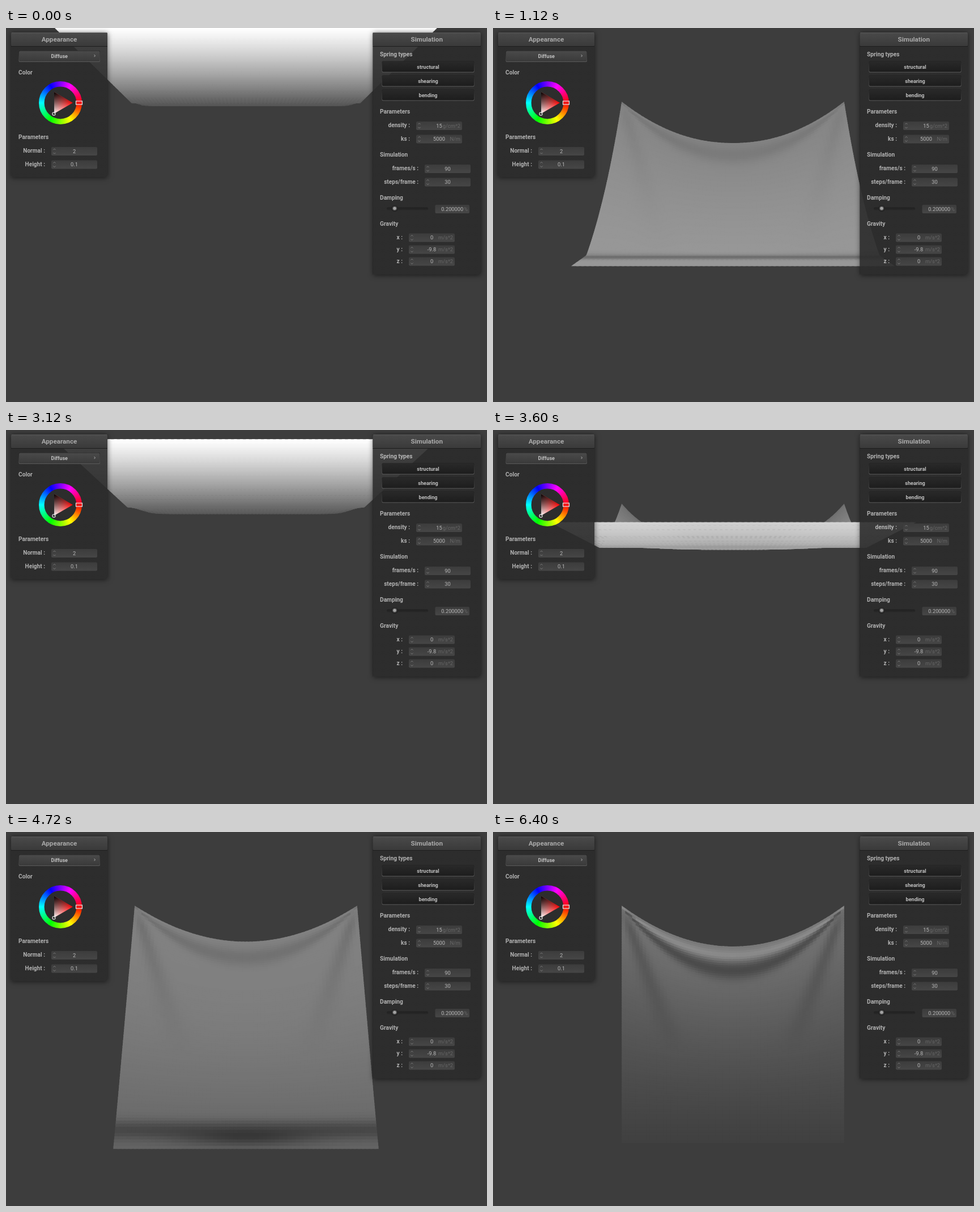
An HTML page with a canvas that plays this animation: 849 by 660 pixels, repeating every 6480 ms.

```html
<!DOCTYPE html>
<html lang="en">
<head>
<meta charset="utf-8">
<title>Cloth simulation</title>
<style>
  html, body { margin: 0; width: 100%; height: 100%; overflow: hidden; background: #3d3d3d; }
  canvas { display: block; }
</style>
</head>
<body>
<canvas id="stage" width="849" height="660"></canvas>
<script>
const W = 849, H = 660, LOOP = 6480, STEP = 80;
const CX = 423.5, HORIZON = 330, PIN_Y = 130, HALF = 196.3, DEPTH = 928;
const COLS = 64, ROWS = 90;

// Side profile of the cloth: pin -> kink -> free end, as forward distance and drop.
// time, kinkZ, kinkDrop, endZ, endDrop, sag, sagPower, bulge
const POSE = [
  [0, 0, 0, 393, 0, 0, 30, 0],
  [238, 25, 8, 393, 8, 8, 25, 0],
  [350, 56, 18.5, 391, 18.5, 18.5, 14, 1],
  [800, 150, 91, 368, 91, 62, 4, 8],
  [1358, 224, 254, 290, 262, 73, 2.1, 24],
  [1678, 190, 335, 212, 352, 70, 2, 12],
  [2078, 112, 358, 127, 403, 62, 2, 0],
  [2670, 51, 368, 58, 418, 69, 2, 0],
  [3630, 0, 369, 0, 419, 72, 2, 0]
];
// time, light at top, middle and end, kink band, bottom pool, ridge, arc fold, arc radius, diagonal fold
const LIGHT = [
  [0, 80, 165, 258, 0, 0, 0, 0, 95, 0],
  [350, 88, 158, 256, 0, 0, 0, 0, 95, 0],
  [800, 112, 172, 215, 10, 0, 0, 4, 95, 0],
  [1358, 132, 147, 152, 42, 0, 0, 12, 95, 8],
  [1678, 130, 138, 130, 36, 8, 0, 14, 92, 14],
  [2078, 128, 116, 90, 30, 34, 2, 16, 92, 20],
  [2670, 122, 94, 74, 0, 0, 8, 18, 105, 27],
  [3630, 118, 88, 64, 0, 0, 26, 36, 112, 28]
];

const ctx = document.getElementById('stage').getContext('2d');
const bell = x => Math.exp(-x * x);

// Smooth interpolation of every column through the keys.
function sample(keys, time) {
  const last = keys.length - 1;
  const t = Math.min(time, keys[last][0]);
  let i = 0;
  while (i < last - 1 && t > keys[i + 1][0]) i++;
  const a = keys[Math.max(i - 1, 0)], b = keys[i], c = keys[i + 1], d = keys[Math.min(i + 2, last)];
  const span = c[0] - b[0], s = (t - b[0]) / span;
  return b.slice(1).map((p, k) => {
    const q = c[k + 1];
    const m0 = (q - a[k + 1]) / (c[0] - a[0]) * span;
    const m1 = (d[k + 1] - p) / (d[0] - b[0]) * span;
    const e = s * s * (3 - 2 * s);
    return p + (q - p) * e + m0 * s * (1 - s) ** 2 - m1 * s * s * (1 - s);
  });
}

function drawCloth(time) {
  const [kz, kd, ez, ed, sag, power, bulge] = sample(POSE, time);
  const [top, mid, end, band, pool, ridge, fold, radius, diagonal] = sample(LIGHT, time);
  const upper = Math.hypot(kz, kd);
  const kink = Math.max(upper / (upper + Math.hypot(ez - kz, ed - kd)), 0.001);

  function point(u, v) {
    let z, drop;
    if (v < kink) {
      const a = v / kink;
      z = kz * a;
      drop = kd * a + 4 * bulge * a * (1 - a) + sag * (1 - Math.abs(u) ** power) * (1 - a);
    } else {
      const a = (v - kink) / (1 - kink);
      z = kz + (ez - kz) * a;
      drop = kd + (ed - kd) * a;
    }
    const scale = DEPTH / (DEPTH - z);
    return { x: CX + u * HALF * scale, y: HORIZON + (PIN_Y - HORIZON + drop) * scale, drop };
  }

  function shade(u, v, drop) {
    const base = top * (1 - v) * (1 - 2 * v) + mid * 4 * v * (1 - v) + end * v * (2 * v - 1);
    const r = drop / (1.02 - u * u);
    const inset = HALF * (1 - Math.abs(u));
    const fade = Math.min(1, drop / 40) * Math.max(0, 1 - drop / 260);
    return base
      - band * bell((v - kink - 0.03) / 0.035)
      - pool * bell(u / 0.5) * bell((v - 0.965) / 0.03)
      + ridge * bell((r - radius + 25) / 10)
      - fold * bell((r - radius) / 16)
      - diagonal * fade * bell((inset - 0.37 * drop) / (7 + 0.06 * drop));
  }

  // Cells reach under their later neighbours so that no seams show.
  for (let j = 0; j < ROWS; j++) {
    const v0 = j / ROWS, v1 = Math.min((j + 1.5) / ROWS, 1);
    for (let i = 0; i < COLS; i++) {
      const u0 = i / COLS * 2 - 1, u1 = Math.min((i + 1.5) / COLS, 1) * 2 - 1;
      const um = (i + 0.5) / COLS * 2 - 1, vm = (j + 0.5) / ROWS;
      const l = Math.round(shade(um, vm, point(um, vm).drop));
      ctx.fillStyle = `rgb(${l},${l},${l})`;
      ctx.beginPath();
      for (const [u, v] of [[u0, v0], [u1, v0], [u1, v1], [u0, v1]]) {
        const p = point(u, v);
        ctx.lineTo(p.x, p.y);
      }
      ctx.fill();
    }
  }
}

// Panels are painted once on their own layer.
const layer = document.createElement('canvas');
layer.width = W;
layer.height = H;
const ui = layer.getContext('2d');
const INK = 'rgba(255,255,255,.63)', DIM = '#666';

function text(str, x, y, size, { bold = true, align = 'left', color = INK } = {}) {
  ui.font = `${bold ? 'bold ' : ''}${size}px Roboto, sans-serif`;
  ui.textAlign = align;
  ui.textBaseline = 'middle';
  ui.fillStyle = color;
  ui.fillText(str, x, y + 0.5);
}

function box(x, y, w, h, from, to, r = 2) {
  const g = ui.createLinearGradient(0, y, 0, y + h);
  g.addColorStop(0, from);
  g.addColorStop(1, to);
  ui.fillStyle = g;
  ui.beginPath();
  ui.roundRect(x, y, w, h, r);
  ui.fill();
}

function line(color, width, ...pts) {
  ui.strokeStyle = color;
  ui.lineWidth = width;
  ui.beginPath();
  pts.forEach(p => ui.lineTo(...p));
  ui.stroke();
}

function panel(title, x, y, w, h) {
  ui.save();
  ui.beginPath();
  ui.rect(0, 0, W, H);
  ui.rect(x, y, w, h);
  ui.clip('evenodd');
  ui.shadowColor = 'rgba(0,0,0,.6)';
  ui.shadowBlur = 9;
  ui.shadowOffsetY = 1;
  ui.fillStyle = '#000';
  ui.fillRect(x, y, w, h);
  ui.restore();
  box(x, y, w, h, 'rgba(43,43,43,.9)', 'rgba(43,43,43,.9)');
  box(x, y, w, 24, '#4a4a4a', '#3a3a3a');
  line('#5a5a5a', 1, [x + 1, y + 0.5], [x + w - 1, y + 0.5]);
  line('#1d1d1d', 1, [x, y + 24.5], [x + w, y + 24.5]);
  text(title, x + w / 2, 20, 11.7, { align: 'center', color: '#a9a9a9' });
}

function button(label, x, y, w, from, to) {
  box(x - 0.5, y - 0.5, w + 1, 20, '#1d1d1d', '#5c5c5c');
  box(x, y, w, 18.5, from, to);
  text(label, x + w / 2, y + 9.5, 9.1, { align: 'center', color: '#c0c0c0' });
}

function field(label, value, x, y, unit = '', w = 81, spin = true) {
  if (label) text(label + ' :', x - 11, y + 7, 10.1, { align: 'right' });
  box(x, y, w, 15, '#3c3c3c', '#464646');
  text(value, x + w / 2, y + 7.5, 9.3, { bold: false, align: 'center' });
  text(unit, x + w - 3, y + 7.5, 9.3, { bold: false, align: 'right', color: DIM });
  if (spin) for (const s of [-1, 1])
    line('#7c7c7c', 1, [x + 3.5, y + 7.5 + 2.5 * s], [x + 5.5, y + 7.5 + 4.5 * s], [x + 7.5, y + 7.5 + 2.5 * s]);
}

function colorWheel(x, y) {
  const hue = ui.createConicGradient(0, x, y);
  for (let i = 0; i <= 6; i++) hue.addColorStop(i / 6, `hsl(${i * 60},100%,50%)`);
  ui.strokeStyle = hue;
  ui.lineWidth = 9.5;
  ui.beginPath();
  ui.arc(x, y, 33.2, 0, 7);
  ui.stroke();

  const tip = [x + 22, y], black = [x - 11, y - 19], white = [x - 11, y + 19];
  const tint = ui.createLinearGradient(...tip, ...white);
  tint.addColorStop(0, '#f00');
  tint.addColorStop(1, '#fff');
  const dark = ui.createLinearGradient(x + 5.5, y + 9.5, ...black);
  dark.addColorStop(0, 'rgba(0,0,0,0)');
  dark.addColorStop(1, '#000');
  ui.beginPath();
  [tip, black, white].forEach(p => ui.lineTo(...p));
  ui.closePath();
  for (const g of [tint, dark]) {
    ui.fillStyle = g;
    ui.fill();
  }
  ui.strokeStyle = '#ddd';
  ui.lineWidth = 1.2;
  ui.beginPath();
  ui.arc(white[0] - 0.5, white[1] + 0.5, 2.6, 0, 7);
  ui.stroke();
  ui.fillStyle = '#f01818';
  ui.fillRect(x + 27.5, y - 3, 11, 6);
  ui.strokeStyle = '#e8e8e8';
  ui.strokeRect(x + 27.5, y - 3, 11, 6);
}

function drawPanels() {
  const heading = (str, x, y) => text(str, x, y, 10.2);

  panel('Appearance', 9, 8, 170, 255);
  button('Diffuse', 23, 40.5, 142.5, '#4a4a4a', '#3a3a3a');
  line('#b0b0b0', 1, [155.5, 47], [157.5, 49], [155.5, 51]);
  heading('Color', 22, 78);
  colorWheel(96, 132);
  heading('Parameters', 22, 192);
  field('Normal', '2', 80, 210);
  field('Height', '0.1', 80, 233.5);

  panel('Simulation', 647.5, 8, 190.5, 427);
  heading('Spring types', 660, 46.5);
  ['structural', 'shearing', 'bending'].forEach((s, i) => button(s, 664, 59 + 25 * i, 162, '#292929', '#1d1d1d'));
  heading('Parameters', 660, 147);
  field('density', '15', 724, 165, 'g/cm^2');
  field('ks', '5000', 724, 188.5, 'N/m');
  heading('Simulation', 660, 223);
  field('frames/s', '90', 739, 241);
  field('steps/frame', '30', 739, 264.5);
  heading('Damping', 660, 299);
  box(672, 316.5, 73, 5, '#202020', '#282828');
  ui.fillStyle = '#1c1c1c';
  ui.beginPath();
  ui.arc(686, 318.5, 5.5, 0, 7);
  ui.fill();
  box(681.5, 314, 9, 9, '#4c4c4c', '#3a3a3a', 4.5);
  box(683.2, 315.7, 5.6, 5.6, '#b0b0b0', '#969696', 2.8);
  field('', '0.200000', 757.5, 312, '%', 60.5, false);
  heading('Gravity', 660, 345);
  field('x', '0', 711, 362.5, 'm/s^2');
  field('y', '-9.8', 711, 383.5, 'm/s^2');
  field('z', '0', 711, 404.5, 'm/s^2');
}

let shown = -1;
function tick() {
  const t = Math.floor(performance.now() % LOOP / STEP) * STEP;
  if (t !== shown) {
    shown = t;
    ctx.fillStyle = '#3d3d3d';
    ctx.fillRect(0, 0, W, H);
    // The cloth is dropped anew partway through the loop.
    drawCloth(t < 2800 ? t + 238 : t - 2770);
    ctx.drawImage(layer, 0, 0);
  }
  requestAnimationFrame(tick);
}

drawPanels();
tick();
</script>
</body>
</html>
```
